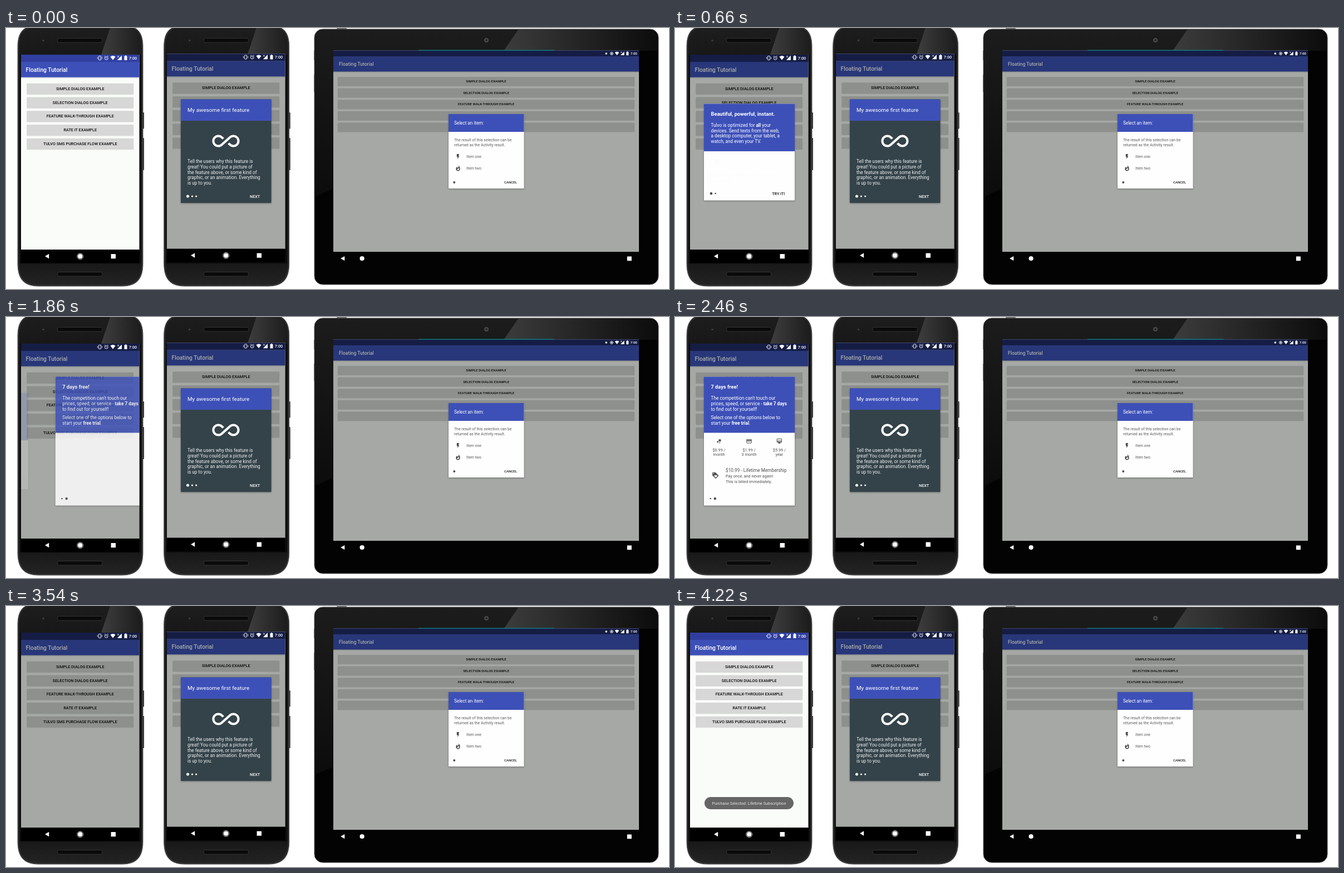
These frames come from a looping animation (1191x470 px, 4300 ms). An HTML page:

```html
<!DOCTYPE html>
<html lang="en">
<head>
<meta charset="utf-8">
<title>Floating Tutorial</title>
<style>
html, body { margin: 0; width: 100%; height: 100%; overflow: hidden; background: #fff; }
svg { display: block; width: 1191px; height: 470px; font-family: Roboto, "Noto Sans", sans-serif; }
text { white-space: pre; }
.b { font-weight: 700; }
.m { font-weight: 500; }
.card { filter: drop-shadow(0 1px 1.5px rgba(0, 0, 0, .35)); }
</style>
</head>
<body>
<svg id="stage" viewBox="0 0 1191 470" xmlns="http://www.w3.org/2000/svg"></svg>
<script>
const LOOP = 4300;
const BLUE = '#3d50b8', INK = '#505050', SHADE = '#000600';

const ICONS = {
  infinity: 'M18.6 6.62c-1.44 0-2.8.56-3.77 1.53L12 10.66 10.48 12h.01L7.8 14.39c-.64.64-1.49.99-2.4.99-1.87 0-3.39-1.51-3.39-3.38S3.53 8.62 5.4 8.62c.91 0 1.76.35 2.44 1.03l1.13 1 1.51-1.34L9.22 8.2C8.2 7.18 6.84 6.62 5.4 6.62 2.42 6.62 0 9.04 0 12s2.42 5.38 5.4 5.38c1.44 0 2.8-.56 3.77-1.53l2.83-2.5.01.01L13.52 12h-.01l2.69-2.39c.64-.64 1.49-.99 2.4-.99 1.87 0 3.39 1.51 3.39 3.38s-1.52 3.38-3.39 3.38c-.9 0-1.76-.35-2.44-1.03l-1.14-1.01-1.51 1.34 1.27 1.12c1.02 1.01 2.37 1.57 3.82 1.57 2.98 0 5.4-2.41 5.4-5.38s-2.42-5.37-5.4-5.37z',
  square: 'M4 4h16v16H4z',
  phone: 'M17 1H7C5.9 1 5 1.9 5 3v18c0 1.1.9 2 2 2h10c1.1 0 2-.9 2-2V3c0-1.1-.9-2-2-2zm0 18H7V5h10v14z',
  desktop: 'M21 2H3c-1.1 0-2 .9-2 2v12c0 1.1.9 2 2 2h7v2H8v2h8v-2h-2v-2h7c1.1 0 2-.9 2-2V4c0-1.1-.9-2-2-2zm0 14H3V4h18v12z',
  tablet: 'M21 4H3c-1.1 0-2 .9-2 2v12c0 1.1.9 2 2 2h18c1.1 0 2-.9 2-2V6c0-1.1-.9-2-2-2zm-2 14H5V6h14v12z',
  watch: 'M20 12c0-2.54-1.19-4.81-3.04-6.27L16 0H8l-.95 5.73C5.19 7.19 4 9.45 4 12s1.19 4.81 3.05 6.27L8 24h8l.96-5.73C18.81 16.81 20 14.54 20 12zM6 12c0-3.31 2.69-6 6-6s6 2.69 6 6-2.69 6-6 6-6-2.69-6-6z',
  bubbles: 'M4 14.4a3.2 3.2 0 1 0 6.4 0a3.2 3.2 0 1 0-6.4 0zM12.8 18a2 2 0 1 0 4 0a2 2 0 1 0-4 0zM10.4 8.8a4.8 4.8 0 1 0 9.6 0a4.8 4.8 0 1 0-9.6 0z',
  card: 'M20 4H4c-1.1 0-2 .9-2 2v12c0 1.1.9 2 2 2h16c1.1 0 2-.9 2-2V6c0-1.1-.9-2-2-2zm0 14H4v-6h16v6zm0-10H4V6h16v2z',
  member: 'M20 2H4c-1.1 0-2 .9-2 2v11c0 1.1.9 2 2 2h4v5l4-2 4 2v-5h4c1.1 0 2-.9 2-2V4c0-1.1-.9-2-2-2zm0 13H4v-2h16v2zm0-5H4V4h16v6z',
  tag: 'M21.41 11.58l-9-9C12.05 2.22 11.55 2 11 2H4c-1.1 0-2 .9-2 2v7c0 .55.22 1.05.59 1.42l9 9c.36.36.86.58 1.41.58s1.05-.22 1.41-.59l7-7c.37-.36.59-.86.59-1.41s-.23-1.06-.59-1.42zM5.5 7a1.5 1.5 0 1 1 0-3a1.5 1.5 0 1 1 0 3zm11.77 8.27L13 19.54l-4.27-4.27C8.28 14.81 8 14.19 8 13.5c0-1.38 1.12-2.5 2.5-2.5.69 0 1.32.28 1.77.74l.73.72.73-.73c.45-.45 1.08-.73 1.77-.73 1.38 0 2.5 1.12 2.5 2.5 0 .69-.28 1.32-.73 1.77z',
  bolt: 'M7 2v11h3v9l7-12h-4l4-8z',
  fire: 'M13.5.67s.74 2.65.74 4.8c0 2.06-1.35 3.73-3.41 3.73-2.07 0-3.63-1.67-3.63-3.73l.03-.36C5.21 7.51 4 10.62 4 14c0 4.42 3.58 8 8 8s8-3.58 8-8C20 8.61 17.41 3.8 13.5.67zM11.71 19c-1.78 0-3.22-1.4-3.22-3.14 0-1.62 1.05-2.76 2.81-3.12 1.77-.36 3.6-1.21 4.62-2.58.39 1.29.59 2.65.59 4.04 0 2.65-2.15 4.8-4.8 4.8z'
};

const rect = (x, y, x2, y2, fill, more = '') =>
  `<rect x="${x}" y="${y}" width="${x2 - x}" height="${y2 - y}" fill="${fill}" ${more}/>`;
const dot = (x, y, r, fill, more = '') => `<circle cx="${x}" cy="${y}" r="${r}" fill="${fill}" ${more}/>`;
const path = (d, fill, more = '') => `<path d="${d}" fill="${fill}" ${more}/>`;
const group = (more, ...parts) => `<g ${more}>${parts.join('')}</g>`;
const text = (x, y, size, fill, str, more = '') =>
  `<text x="${x}" y="${y}" font-size="${size}" fill="${fill}" ${more}>${str}</text>`;
const lines = (x, y, step, size, fill, rows, more) =>
  rows.map((row, i) => text(x, y + i * step, size, fill, row, more)).join('');
const bold = s => `<tspan class="b">${s}</tspan>`;
const icon = (name, x, y, scale, fill) => path(ICONS[name], fill,
  `fill-rule="evenodd" transform="translate(${x} ${y}) scale(${scale}) translate(-12 -12)"`);
const MID = 'text-anchor="middle"';

const LABELS = ['SIMPLE DIALOG EXAMPLE', 'SELECTION DIALOG EXAMPLE', 'FEATURE WALK-THROUGH EXAMPLE',
  'RATE IT EXAMPLE', 'TULVO SMS PURCHASE FLOW EXAMPLE'];

function buttons(x, x2, y, h, step, size) {
  return LABELS.map((label, i) => {
    const top = y + i * step;
    return rect(x - .3, top + .6, x2 + .3, top + h + 1.2, '#000', 'rx="1.2" opacity=".13"') +
      rect(x, top, x2, top + h, '#d6d7d6', 'rx="1"') +
      text((x + x2) / 2, top + h / 2 + size * .36, size, '#0c0c0c', label, `${MID} class="m"`);
  }).join('');
}

// Wifi, signal and battery, centred on the wifi fan.
const signals = `
  <path d="M-4.6 -2.2Q0 -5.6 4.6 -2.2L0 3.8Z"/>
  <path d="M16 -4.4V3.8H7.8Z"/>
  <path d="M8 -4l3 3m0 -3l-3 3" stroke="#fff" stroke-width=".9"/>
  <path d="M20.5 -3.5h1.3v-1h2.4v1h1.3v7.6h-5z"/>`;

const phoneStatus = `
  <g fill="#fff">
    <rect x="166.6" y="50.5" width="3.9" height="7" rx=".5" fill="none" stroke="#fff" stroke-width=".9"/>
    <path d="M164.5 52.2v3.6M172.6 52.2v3.6" stroke="#fff" stroke-width=".8"/>
    <circle cx="180.2" cy="54.4" r="2.9" fill="none" stroke="#fff" stroke-width=".9"/>
    <path d="M180.2 52.8v1.8l1.2 .7M176.5 51.6l1.9 -1.6M183.9 51.6l-1.9 -1.6" fill="none" stroke="#fff" stroke-width=".7"/>
    <g transform="translate(192 54)">${signals}</g>
    ${text(220.8, 56.8, 7.3, '#fff', '7:00', 'class="m"')}
  </g>`;

const phoneNav = rect(27, 399, 239.5, 423.5, '#000') +
  path('M70 411l7.2 -4.2v8.4z', '#fff') +
  dot(133.2, 411.2, 4.1, '#fff') + dot(133.2, 411.2, 5.4, 'none', 'stroke="#fff" stroke-width=".8"') +
  rect(188.6, 407, 197, 415.2, '#fff');

const phoneApp = rect(27, 48, 239.5, 400, '#fafcfa') +
  rect(27, 88, 239.5, 90.5, '#000', 'opacity=".12"') +
  rect(27, 48, 239.5, 61, '#303f9f') + rect(27, 61, 239.5, 88.7, BLUE) +
  text(35.6, 78.6, 10.3, '#fff', 'Floating Tutorial', 'class="m"') +
  buttons(37.5, 229, 99.7, 19.3, 24.75, 7.22);

const phoneDim = rect(27, 48, 239.5, 400, SHADE, 'opacity=".34"') +
  rect(27, 48, 239.5, 61, '#000', 'opacity=".34"');

const SHELL = 'M21 34C21 12 28 -2 48 -3H219C239 -2 246 12 246 34V424C246 452 235 465 208 465H59C32 465 21 452 21 424Z';
const slot = y => rect(92.5, y, 173, y + 7.5, '#0a0a0a', 'rx="3" stroke="#3c3c3c" stroke-width=".8"');
const phoneBody =
  rect(244.8, 152, 248, 181.5, '#2a2a2a', 'rx="1"') + rect(244.8, 198, 248, 256, '#2a2a2a', 'rx="1"') +
  path(SHELL, 'url(#shell)') +
  path('M187 0H222C235 4 242 14 243 34V48H171Z', 'url(#gloss)') +
  path(SHELL, 'none', 'stroke="#555" stroke-width="5" opacity=".25" clip-path="url(#phoneShape)"') +
  path(SHELL, 'none', 'stroke="#606060" stroke-width="1"') +
  rect(25, 48, 242, 424, '#0c0c0c') +
  dot(67, 22.5, 1.8, '#3c3c3c') + slot(18.5) + slot(439.5);

const infoDialog = group('class="card"', rect(314, 128.5, 476.5, 315, '#344349', 'rx="1"')) +
  rect(314, 128.5, 476.5, 167, BLUE) +
  text(326, 151.4, 9.85, '#fff', 'My awesome first feature') +
  icon('infinity', 395, 203.5, 2.05, '#fff') +
  lines(326, 243.2, 9.7, 8.26, '#eef1f1', ['Tell the users why this feature is', 'great! You could put a picture of',
    'the feature above, or some kind of', 'graphic, or an animation. Everything', 'is up to you.']) +
  dot(326.5, 303, 2.5, '#fff') + dot(334.5, 303, 1.6, '#fff') + dot(341.7, 303, 1.6, '#fff') +
  text(438, 305.6, 7.22, '#fff', 'NEXT', 'class="m"');

function cardBase(top, split, bottom, title) {
  return group('class="card"', rect(52, top, 215, bottom, '#fefefe', 'rx="1"')) +
    rect(52, top, 215, split, BLUE) + text(64.5, top + 21.6, 9.25, '#fff', title, 'class="b"');
}

const devices = ['square', 'phone', 'desktop', 'tablet', 'watch'];
const firstPage = cardBase(136.5, 222, 310.5, 'Beautiful, powerful, instant.') +
  lines(64.5, 178, 9.7, 8.26, '#fff', [`Tulvo is optimized for ${bold('all')} your`, 'devices. Send texts from the web,',
    'a desktop computer, your tablet, a', 'watch, and even your TV.']) +
  devices.map((name, i) => group('class="device"', icon(name, 84 + i * 24.7, 240.5, .516, INK))).join('') +
  group('id="pitch"', lines(64.5, 267.9, 9.6, 8.26, INK,
    [`The first ${bold('true')} oPalaver competitor`, 'for Android.'])) +
  group('id="ripple"', rect(161.5, 287.5, 210, 309, '#fafafa', 'rx="1"'), dot(192, 296, 5, '#f4f4f4')) +
  dot(65, 298, 2.3, '#484848') + dot(72.7, 298, 1.3, '#484848') +
  text(174.2, 301, 7.22, '#161616', 'TRY IT!', 'class="m"');

const price = (x, name, rows) => icon(name, x, 223.7, .47, INK) + lines(x, 241.6, 7.9, 7.3, INK, rows, MID);
const secondPage = cardBase(107.5, 208.5, 339.5, '7 days free!') +
  lines(64.5, 149.2, 9.7, 8.26, '#fff', ["The competition can't touch our",
    `prices, speed, or service - ${bold('take 7 days')}`, 'to find out for yourself!']) +
  lines(64.5, 184, 9.6, 8.26, '#fff', ['Select one of the options below to', `start your ${bold('free trial')}.`]) +
  group('id="offers"',
    price(79, 'bubbles', ['$0.99 /', 'month']),
    price(133, 'card', ['$1.99 /', '3 month']),
    price(187.4, 'member', ['$5.99 /', 'year']),
    icon('tag', 72.6, 285.2, .55, INK),
    text(91, 279, 8.26, INK, '$10.99 - Lifetime Membership'),
    lines(91, 289, 9.6, 7.25, INK, ['Pay once, and never again!', 'This is billed immediately.'])) +
  dot(63.7, 327, 1.3, '#484848') + dot(71.9, 327, 2.2, '#484848');

const toast = rect(53, 344, 213, 366, '#666', 'rx="11"') +
  text(133, 357.9, 7.3, '#e4e4e4', 'Purchase Selected: Lifetime Subscription', MID);

const tabletBody =
  rect(594, 0, 612, 4, '#777', 'rx="1"') + rect(553, 41, 556, 58, '#777') + rect(553, 84, 556, 115, '#777') +
  rect(554, 2, 1172, 462, '#030303', 'rx="15"') +
  path('M555 304V18Q555 3 570 3H920L894 41H588V289Z', 'url(#slab)') +
  path('M920 3H1156Q1171 3 1171 18V41H894Z', 'url(#slabGloss)') +
  rect(554, 2, 1172, 462, 'none', 'rx="15" stroke="#5c5c5c"') +
  dot(863, 22, 4, '#4a4a4a') + dot(863, 22, 2, '#23272a');

const tabletApp = rect(588, 40.5, 1137, 403, '#fafcfa') +
  rect(588, 78, 1137, 80, '#000', 'opacity=".12"') +
  rect(588, 40.5, 1137, 51, '#303f9f') + rect(588, 51, 1137, 78.5, BLUE) +
  text(598, 68.4, 8.65, '#fff', 'Floating Tutorial', 'class="m"') +
  buttons(596, 1129, 88, 16, 20.6, 6.06) +
  rect(588, 40.5, 1137, 403, SHADE, 'opacity=".34"') + rect(588, 40.5, 1137, 51, '#000', 'opacity=".34"') +
  rect(741, 39.5, 985, 40.8, '#0b8088') +
  group('fill="#fff"', dot(1078.3, 46, 1.8, '#fff'),
    dot(1088, 46, 2.5, 'none', 'stroke="#fff" stroke-width=".9"'), dot(1088, 46, 1.2, '#fff'),
    `<g transform="translate(1097.5 46) scale(.82)">${signals}</g>`,
    text(1121.8, 48.2, 6.1, '#fff', '7:00', 'class="m"')) +
  path('M601 415l7.3 -4v8z', '#fff') + dot(639.6, 415, 4.1, '#fff') + rect(1115.8, 411.4, 1123.8, 419.2, '#fff');

const pickDialog = group('class="card"', rect(795, 155, 930.5, 289, '#fefefe', 'rx="1"')) +
  rect(795, 155, 930.5, 187, BLUE) +
  text(805, 174, 8.15, '#fff', 'Select an item:') +
  lines(805, 204.4, 8.2, 6.92, '#5a5a5a', ['The result of this selection can be', 'returned as the Activity result.']) +
  icon('bolt', 812, 231.5, .44, '#444') + text(827, 234.2, 6.92, '#5a5a5a', 'Item one') +
  icon('fire', 812, 252.8, .46, '#444') + text(827, 255.2, 6.92, '#5a5a5a', 'Item two') +
  dot(805.2, 278, 2, '#505050') +
  text(895, 280.4, 6.06, '#161616', 'CANCEL', 'class="m"');

const stage = document.getElementById('stage');
stage.innerHTML = `
  <defs>
    <linearGradient id="shell" x1="0" y1="0" x2="0" y2="1">
      <stop offset="0" stop-color="#1e1e1e"/><stop offset=".12" stop-color="#171717"/>
      <stop offset=".9" stop-color="#171717"/><stop offset="1" stop-color="#242424"/>
    </linearGradient>
    <linearGradient id="slab" x1="0" y1="0" x2="0" y2="1">
      <stop offset="0" stop-color="#1c1c1c"/><stop offset="1" stop-color="#0c0c0c"/>
    </linearGradient>
    <linearGradient id="slabGloss">
      <stop offset="0" stop-color="#3c3c3c"/><stop offset="1" stop-color="#0c0c0c"/>
    </linearGradient>
    <linearGradient id="gloss">
      <stop offset="0" stop-color="#3e3e3e"/><stop offset="1" stop-color="#1c1c1c"/>
    </linearGradient>
    <clipPath id="phoneShape"><path d="${SHELL}"/></clipPath>
    <clipPath id="screen"><rect x="27" y="48" width="212.5" height="351"/></clipPath>
  </defs>` +
  phoneBody + phoneApp + group('id="dim"', phoneDim) +
  group('clip-path="url(#screen)"', group('id="first"', firstPage), group('id="second"', secondPage)) +
  group('id="toast"', toast) + phoneStatus + phoneNav +
  group('transform="translate(262.7 0)"', phoneBody) +
  group('transform="translate(262 -1.5)"', phoneApp, phoneDim, phoneStatus, phoneNav) + infoDialog +
  tabletBody + tabletApp + pickDialog;

const part = Object.fromEntries(['dim', 'first', 'second', 'pitch', 'offers', 'ripple', 'toast']
  .map(id => [id, document.getElementById(id)]));
const deviceParts = [...document.querySelectorAll('.device')];

const span = (t, from, to) => Math.min(1, Math.max(0, (t - from) / (to - from)));
const smooth = p => (1 - Math.cos(Math.PI * p)) / 2;
const settle = p => 1 - (1 - p) ** 2;

function pose(el, alpha, x = 0, y = 0) {
  el.style.display = alpha > 0 ? '' : 'none';
  el.setAttribute('opacity', alpha.toFixed(4));
  el.setAttribute('transform', `translate(${x.toFixed(2)} ${y.toFixed(2)})`);
}

function reveal(el, t, start, length) {
  const p = smooth(span(t, start, start + length));
  pose(el, p, -8 * (1 - p));
}

function render(time) {
  const t = Math.max(0, Math.floor((time - 20) / 40) * 40 + 20);

  pose(part.dim, span(t, 60, 260) * (1 - span(t, 3540, 3620)));

  const open = settle(span(t, 140, 500));
  const close = settle(span(t, 3180, 3480));
  const swipe = t < 1660 ? 0 : 1 - (1 - span(t, 1658.5, 2340)) ** 5;
  pose(part.first, open * (1 - swipe), -212 * swipe, 8 * (1 - open));
  pose(part.second, swipe * (1 - close), 212 * (1 - swipe), 8 * close);
  pose(part.ripple, t >= 1660 ? 1 : 0);

  deviceParts.forEach((el, i) => reveal(el, t, 640 + i * 70, 300));
  reveal(part.pitch, t, 640, 300);
  reveal(part.offers, t, 2180, 280);

  pose(part.toast, span(t, 3820, 4220));
}

const begin = performance.now();
function tick() {
  render((performance.now() - begin) % LOOP);
  requestAnimationFrame(tick);
}
tick();
</script>
</body>
</html>
```
